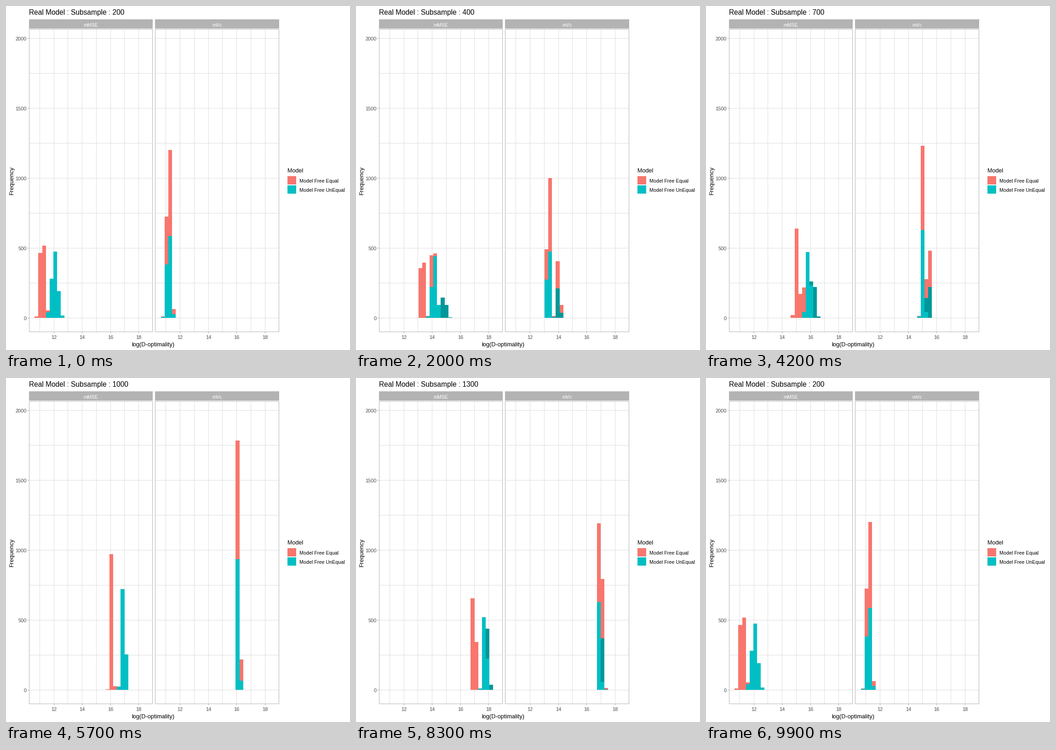
A matplotlib script for the animation above (10 s loop, 748 by 748 pixels).

```python
import math

import numpy as np
import matplotlib.pyplot as plt
from matplotlib.animation import FuncAnimation
from matplotlib.collections import PolyCollection
from matplotlib.patches import Rectangle

SIZE, DPI = 748, 64
RED, TEAL, DEEP = "#F8766D", "#00BFC4", "#009799"
GRID, EDGE, TICK = "#DEDEDE", "#B3B3B3", "#4D4D4D"
BINS, BIN_W, BIN_X = 30, 8.135, 62.35
BASE_Y, UNIT = 678, 0.304
PANELS = {"mMSE": 0, "mVc": 274.4}

# Bin position of the mean at 200, growth per log(subsample), spread at 200.
EQUAL = {"mMSE": (2.03, 11.53, 0.435), "mVc": (2.18, 11.55, 0.46)}
UNEQUAL = {"mMSE": (5.37, 11.42, 0.78), "mVc": (2.13, 11.52, 0.45)}
SUBSAMPLES = range(200, 1501, 100)
COUNT = len(SUBSAMPLES)

HOLD = 4
STEPS = [4] * 3 + [3] * 3 + [2] + [3] * 7


def histogram(n, mean, growth, spread):
    """1000 normal draws as expected counts per bin."""
    mid = mean + growth * math.log(n / 200)
    sd = spread * (200 / n) ** 0.45
    cdf = [0.5 + 0.5 * math.erf((k - mid) / sd / math.sqrt(2))
           for k in range(BINS + 1)]
    return np.round(1000 * np.diff(cdf))


def history(model):
    return {name: [histogram(n, *args) for n in SUBSAMPLES]
            for name, args in model.items()}


def build_timeline():
    """Per frame: current state, next state and progress between them."""
    frames = []
    for i, steps in enumerate(STEPS):
        frames += [(i, i, 0.0)] * (HOLD if i == 0 else HOLD + 1)
        frames += [(i, (i + 1) % COUNT, s / steps) for s in range(1, steps)]
    return frames + [(0, 0, 0.0)]


equal, unequal = history(EQUAL), history(UNEQUAL)
timeline = build_timeline()

plt.rcParams["font.family"] = "Liberation Sans"
fig = plt.figure(figsize=(SIZE / DPI, SIZE / DPI), dpi=DPI, facecolor="white")
ax = fig.add_axes([0, 0, 1, 1])
ax.set_xlim(0, SIZE)
ax.set_ylim(SIZE, 0)
ax.axis("off")


def box(x, y, w, h, color, z=1):
    ax.add_patch(Rectangle((x, y), w, h, fc=color, lw=0, antialiased=False,
                           zorder=z))


def label(x, y, text, px, color="black", ha="left", va="baseline", **kw):
    return ax.text(x, y, text, fontsize=px * 72 / DPI, color=color, ha=ha,
                   va=va, zorder=5, **kw)


def draw_panel(name, dx):
    left, right, top, bottom = int(50 + dx), int(318.6 + dx), 50, 708
    width = right - left
    box(left, 29, width + 1, 20, EDGE)
    label(184.5 + dx, 44.5, name, 10.6, "white", "center")
    for i in range(8):
        x = int(73.4 + 30.75 * i + dx)
        box(x, top, 1, bottom - top, GRID)
        if i % 2:
            box(x, bottom, 1, 4, EDGE, 4)
            label(x + 0.5, 724, str(11 + i), 11, TICK, "center")
    for value in range(0, 2001, 250):
        box(left, round(BASE_Y - value * UNIT), width, 1, GRID)
    for x in (left, right):
        box(x, top, 1, bottom - top + 1, EDGE, 4)
    for y in (top, bottom):
        box(left, y, width, 1, EDGE, 4)


for name, dx in PANELS.items():
    draw_panel(name, dx)
for value in range(0, 2001, 500):
    y = round(BASE_Y - value * UNIT)
    box(47, y, 3, 1, EDGE, 4)
    label(45, y + 4.7, str(value), 11, TICK, "right")

title = label(50, 19, "", 15.5)
label(320, 740, "log(D-optimality)", 12.8, ha="center")
label(12.8, 379, "Frequency", 13, ha="center", va="center", rotation=90)
label(612, 362, "Model", 12.6)
for y, color, text in ((370, RED, "Model Free Equal"),
                       (390, TEAL, "Model Free UnEqual")):
    box(612, y, 19, 18, color)
    label(638, y + 14, text, 10.6)

bars = {}
for color in (RED, TEAL, DEEP):
    bars[color] = PolyCollection([], facecolors=color, linewidths=0,
                                 antialiased=False, zorder=3)
    ax.add_collection(bars[color], autolim=False)


def bar(dx, k, low, high):
    x0, x1 = (round(BIN_X + dx + j * BIN_W) for j in (k, k + 1))
    y0, y1 = (round(BASE_Y - v * UNIT) for v in (low, high))
    return [(x0, y0), (x1, y0), (x1, y1), (x0, y1)]


def update(frame):
    a, b, p = timeline[frame]
    verts = {color: [] for color in bars}
    for name, dx in PANELS.items():
        red, teal = equal[name], unequal[name]
        lower = (1 - p) * teal[a] + p * teal[b]
        upper = lower + (1 - p) * red[a] + p * red[b]
        # Freshly covered teal is deeper until the move ends.
        settled = np.minimum(lower, teal[a])
        for k in range(BINS):
            for color, low, high in ((TEAL, 0, settled[k]),
                                     (DEEP, settled[k], lower[k]),
                                     (RED, lower[k], upper[k])):
                if high - low > 0.5:
                    verts[color].append(bar(dx, k, low, high))
    for color, coll in bars.items():
        coll.set_verts(verts[color])
    title.set_text(f"Real Model : Subsample : {SUBSAMPLES[b if p >= 0.5 else a]}")
    return [title, *bars.values()]


anim = FuncAnimation(fig, update, frames=len(timeline), interval=100,
                     repeat=True, repeat_delay=0, blit=False)
plt.show()
```
